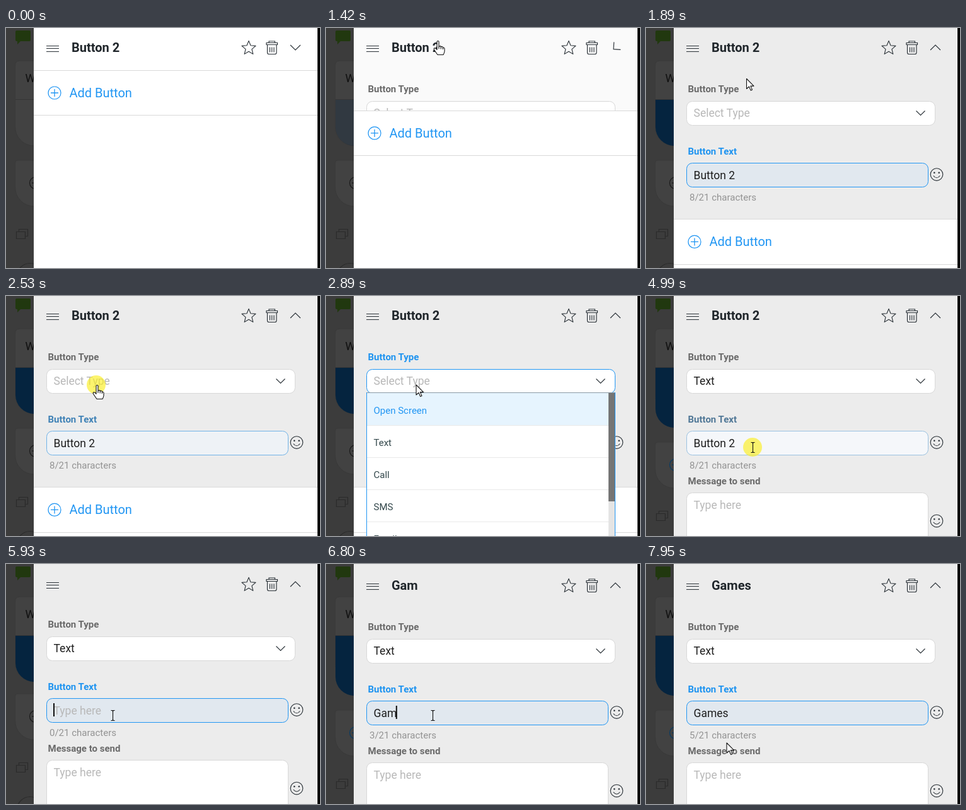
Animation, 498 px wide and 381 px high, one loop 8 s. Source, as an HTML page:

```html
<!DOCTYPE html>
<html lang="en">
<head>
<meta charset="utf-8">
<title>Button editor</title>
<style>
  html, body { margin: 0; width: 100%; height: 100%; overflow: hidden; background: #000; }
  svg { display: block; }
  text { font-family: Roboto, "Liberation Sans", sans-serif; white-space: pre; }
  .title { font-size: 20px; font-weight: 700; fill: #20262b; }
  .label { font-size: 15px; font-weight: 700; fill: #6a6a6a; }
  .value { font-size: 17.5px; fill: #1e1e1e; }
  .hint { fill: #b8b8b8; }
  .small { font-size: 15px; }
  .box { fill: #fff; stroke: #d8d8d8; }
  .icon { fill: none; stroke: #2b3238; stroke-width: 1.15; }
  .card { fill: #424242; stroke: #393939; }
  .dim { fill: none; stroke: #2b2b2b; stroke-width: 1.2; }
</style>
</head>
<body>
<svg width="498" height="381" viewBox="0 0 498 381">
  <defs>
    <g id="smile" class="icon">
      <circle r="9.8"/>
      <path d="M-5.300 2Q0 8.500 5.300 2"/>
      <path d="M-3.700 -2.800h.01M3.700 -2.800h.01" stroke-width="2.600" stroke-linecap="round"/>
    </g>
  </defs>

  <!-- dimmed preview -->
  <rect width="44" height="381" fill="#3c3c3c"/>
  <path d="M17 4H37Q39 4 39 6V19Q39 21 37 21H23L18 26V21H17Q15 21 15 19V6Q15 4 17 4Z" fill="#21380f"/>
  <path class="card" d="M60 52H22Q14.500 52 14.500 60V157A30 30 0 0 0 44.500 187H60Z"/>
  <rect x="15" y="113" width="29" height="1" fill="#353535"/>
  <text x="30.500" y="86" font-size="18" fill="#101010">W</text>
  <path id="block" fill="#05243f"/>
  <g id="below">
    <path class="card" d="M60 210H18Q14.500 210 14.500 214V253A30 30 0 0 0 44.500 283H60Z"/>
    <g id="addDot" class="dim"><circle cx="47" cy="246" r="9.500"/><path d="M41 246h12"/></g>
    <path class="dim" d="M16.500 323.500h14v11h-14zM20.500 323V319.500h14v11H31"/>
    <circle class="dim" cx="38" cy="394" r="20.500"/>
  </g>

  <!-- panel -->
  <rect x="44" width="450" height="381" fill="#fff"/>
  <rect id="tint" x="44" width="450" height="381" fill="#ececec"/>

  <g id="form">
    <text id="typeLabel" class="label" x="66.500" y="102">Button Type</text>
    <rect id="typeBox" class="box" x="64.500" y="116.500" width="394" height="38" rx="9"/>
    <text id="typeValue" class="value" x="75.500" y="141"></text>
    <path class="icon" d="M428.500 131.500l7 7l7 -7"/>

    <text id="nameLabel" class="label" x="66.500" y="201">Button Text</text>
    <rect id="nameBox" class="box" x="64.500" y="214.500" width="383" height="38" rx="9"/>
    <rect id="picked" x="75" y="222" width="66" height="21" fill="#2f7fd6"/>
    <text id="nameValue" class="value" x="75.500" y="239.500"></text>
    <rect id="caret" y="222" width="2" height="21" fill="#111"/>
    <use href="#smile" x="461" y="232.500"/>
    <text id="count" class="small" x="69" y="274" fill="#939393"></text>

    <g id="message">
      <text class="label" x="66.500" y="299">Message to send</text>
      <rect class="box" x="64.500" y="312.500" width="383" height="90" rx="9"/>
      <text class="value hint" x="75.500" y="338">Type here</text>
      <use href="#smile" x="461" y="357"/>
    </g>
  </g>

  <g id="header">
    <path class="icon" d="M64 28.500h20M64 32.500h20M64 37.500h20" stroke-width="1"/>
    <text id="title" class="title" x="104" y="38"></text>
    <path id="star" class="icon" stroke-linejoin="round"/>
    <path class="icon" d="M413 26.500V23.500H430.500V26.500ZM417 23.500V21H426.500V23.500M414.500 26.500V39Q414.500 41.500 417 41.500H426.500Q429 41.500 429 39V26.500M418.500 30.500v8M421.700 30.500v8M425 30.500v8"/>
    <path id="fold" class="icon" d="M-8 -4L0 4L8 -4"/>
  </g>

  <rect id="rest" x="44" width="450" height="381" fill="#fff"/>
  <rect id="topLine" x="44" width="450" height="1" fill="#d9d9d9"/>
  <rect id="endLine" x="44" width="450" height="1" fill="#d9d9d9"/>
  <g id="add" fill="#2196f3" stroke="#2196f3">
    <path d="M71 36h12M77 30v12" stroke-width="1.300"/>
    <circle cx="77" cy="36" r="10" fill="none" stroke-width="1.200"/>
    <text x="100.500" y="43" font-size="20" stroke="none">Add Button</text>
  </g>

  <g id="menu">
    <rect x="64.500" y="153.500" width="394" height="260" fill="#fff" stroke="#2196f3"/>
    <rect x="65" y="153" width="393" height="1" fill="#8a9aa5"/>
    <rect x="65" y="154" width="383" height="51" fill="#e6f4fe"/>
    <rect id="hover" x="65" y="206" width="383" height="50" fill="#eef7fe"/>
    <g id="items"></g>
    <rect x="448" y="154" width="10" height="240" fill="#e4e4e4"/>
    <rect x="448" y="154" width="10" height="172" fill="#757575"/>
  </g>

  <circle id="click" r="15" fill="#fbee20" opacity=".65"/>
  <path id="cursor" stroke="#111" stroke-width="1.100" stroke-linejoin="round"/>
  <rect x="494" width="4" height="381" fill="#000"/>
</svg>

<script>
const LOOP = 8000;
const BEAT = 77.6;   // the screen refreshes once per beat; all times below are in beats
const $ = {};
document.querySelectorAll('[id]').forEach(el => $[el.id] = el);

// Pointer moves: from beat, to beat, x, y
const moves = [
  [5, 6, 258, 147], [8, 13, 176, 20], [20, 28, 143, 141], [37, 41, 139, 241],
  [41, 45, 129, 237], [55, 61, 169, 240], [100, 102, 128, 284]
];
const clicks = [16, 31, 48, 64];
const keys = [83, 86, 87, 89, 92];
const shapes = {
  arrow: 'M0 0V16L4 12.500L6.700 18.600L9 17.600L6.400 11.600H11.500Z',
  hand: 'M0 1.500Q1.500 -.5 3 1.500V10Q4.500 7.800 6.200 9V10.500Q7.500 8.800 9.300 10V11.500Q12 10.500 12 13V17Q11.500 20 10 22.500H1Q-1.500 19 -4.500 14.500Q-5.500 12 -3.500 11.800Q-1.500 12 0 14.500ZM3 10v3M6.200 10.500v3M9.300 11.500v2.500',
  beam: 'M-2.500 -7.500H-.5L.5 -6.500L1.500 -7.500H3.500M.5 -6.500V7.500M-2.500 8.500H-.5L.5 7.500L1.500 8.500H3.500'
};

const ramp = (b, from, to) => Math.min(1, Math.max(0, (b - from) / (to - from)));
const smooth = p => p * p * (3 - 2 * p);
const during = (b, from, to) => b >= from && b < to;
const mix = (on, off, p) => `color-mix(in srgb, ${on} ${p * 100}%, ${off})`;
const move = (el, x, y, more = '') => el.setAttribute('transform', `translate(${x} ${y})${more}`);
const show = (el, on) => el.style.display = on ? '' : 'none';

function fill(el, text, hint) {
  el.textContent = text;
  el.classList.toggle('hint', hint);
}

function focus(box, label, p) {
  label.style.fill = mix('#1f94f0', '#6a6a6a', p);
  box.style.stroke = mix('#2196f3', '#d8d8d8', p);
}

function pointer(b) {
  return moves.reduce(([x, y], [from, to, nx, ny]) => {
    const p = smooth(ramp(b, from, to));
    return [x + (nx - x) * p, y + (ny - y) * p];
  }, [271, 171]);
}

function pointerKind(b, y) {
  if (during(b, 53, 101)) return 'beam';
  if (b < 9 || b > 100 || during(b, 35, 38)) return 'arrow';
  return y < 67 || y > 115 ? 'hand' : 'arrow';
}

function drawPreview(b, open, name) {
  const drop = b < 48 ? 0 : name ? 22 : -4;
  const end = 187 + Math.max(drop, 0);
  $.block.setAttribute('d', `M44 114H15V${end - 30}A30 30 0 0 0 45 ${end}H44Z`);
  $.block.style.opacity = open;
  move($.below, 0, drop);
  $.addDot.style.stroke = drop > 0 ? '#0a3c63' : '#1a1a1a';
}

function drawForm(b, name) {
  const edited = b >= 76;
  move($.header, 0, edited ? (name ? 3 : 1) : 0);
  move($.form, 0, edited ? (name ? 3 : -1) : 0);
  $.title.textContent = name;

  fill($.typeValue, b < 48 ? 'Select Type' : 'Text', b < 48);
  focus($.typeBox, $.typeLabel, ramp(b, 32, 34) - ramp(b, 47, 48));

  const active = ramp(b, 21, 23) - ramp(b, 31, 33.3) + ramp(b, 63, 66);
  const selected = during(b, 71, 76);
  focus($.nameBox, $.nameLabel, active);
  $.nameBox.style.fill = mix('#e1e8ef', '#fff', active);
  fill($.nameValue, name || 'Type here', !name);
  $.nameValue.style.fill = selected ? '#fff' : '';
  show($.picked, selected);
  $.count.textContent = `${name.length}/21 characters`;
  show($.caret, during(b, 65, 71) || during(b, 76, 99));
  $.caret.setAttribute('x', name ? 74 + $.nameValue.getComputedTextLength() : 75);
  show($.message, b >= 49);
}

function drawAddRow(y) {
  $.rest.setAttribute('y', Math.round(y));
  $.topLine.setAttribute('y', Math.round(y));
  $.endLine.setAttribute('y', Math.round(y + 71.4));
  move($.add, 0, y);
}

function drawMenu(b) {
  const close = ramp(b, 47, 51);
  const seen = ramp(b, 33, 35) * (1 - close) ** 1.5;
  show($.menu, seen > 0);
  $.menu.style.opacity = seen;
  move($.menu, 0, -8 * close);
  show($.hover, b >= 41);
}

function drawPointer(b) {
  const [x, y] = pointer(b);
  const kind = pointerKind(b, y);
  show($.cursor, b >= 5);
  $.cursor.setAttribute('d', shapes[kind]);
  $.cursor.setAttribute('fill', kind === 'beam' ? 'none' : '#fff');
  move($.cursor, x, y);
  show($.click, clicks.some(c => during(b, c, c + 2)));
  move($.click, x, y);
}

function draw(b) {
  const open = ramp(b, 17, 20.7);
  const name = b < 76 ? 'Button 2' : 'Games'.slice(0, keys.filter(k => k <= b).length);
  $.tint.style.opacity = open;
  move($.fold, 459, 31, ` rotate(${180 * open})`);
  drawPreview(b, open, name);
  drawForm(b, name);
  drawAddRow(67 + 236.4 * open + 130 * ramp(b, 50, 51));
  drawMenu(b);
  drawPointer(b);
}

$.star.setAttribute('d', 'M' + Array.from({ length: 10 }, (_, i) => {
  const r = i % 2 ? 5.2 : 11.6, a = Math.PI * (i / 5 - .5);
  return `${(385 + r * Math.cos(a)).toFixed(2)} ${(32 + r * Math.sin(a)).toFixed(2)}`;
}).join('L') + 'Z');

$.items.innerHTML = ['Open Screen', 'Text', 'Call', 'SMS', 'Email'].map((s, i) =>
  `<text class="small" x="75.500" y="${187 + 51 * i}" fill="${i ? '#34484c' : '#2196f3'}">${s}</text>` +
  `<rect x="65" y="${205 + 51 * i}" width="383" height="1" fill="#e9e9e9"/>`).join('');

const start = performance.now();
function loop() {
  const now = (performance.now() - start) % LOOP;
  draw(Math.floor((now - 12) / BEAT));
  requestAnimationFrame(loop);
}
loop();
</script>
</body>
</html>
```
